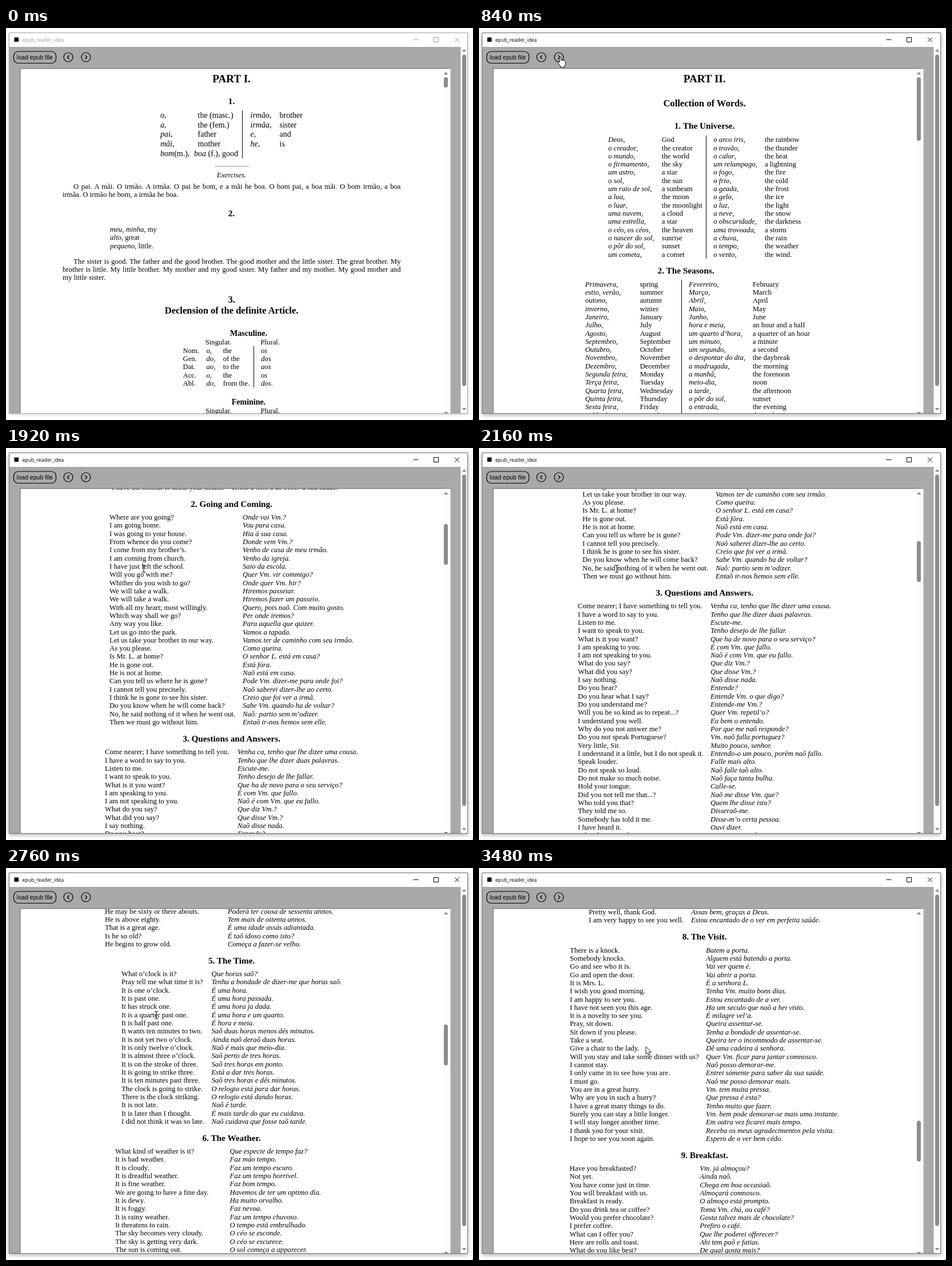
An HTML page for the animation above (3600 ms loop, 817 by 685 pixels).

```html
<!DOCTYPE html>
<html lang="en">
<head>
<meta charset="utf-8">
<title>epub_reader_idea</title>
<style>
html, body { margin: 0; width: 100%; height: 100%; overflow: hidden; background: #fff; }
#win { position: absolute; left: 5px; top: 8px; width: 801px; height: 664px; border: 1px solid #aaa; background: #a9a9a9; box-shadow: 0 1px 5px rgba(0,0,0,.22); }
#win.on { border-color: #777; box-shadow: 0 2px 7px rgba(0,0,0,.35); }
#stage { position: absolute; left: 0; top: 0; width: 817px; height: 685px; display: block; }
.page text, .page div { font: 12.73px "Liberation Serif", "Times New Roman", serif; fill: #000; color: #000; }
.page .i { font-style: italic; }
.page .m { text-anchor: middle; }
.page .h2 { font-size: 19.09px; font-weight: bold; }
.page .h3 { font-size: 16.55px; font-weight: bold; }
.page .h4 { font-size: 15.27px; font-weight: bold; }
.page .h5 { font-size: 14px; font-weight: bold; }
.page .big { font-size: 14px; }
.page div { line-height: 14.32px; text-align: justify; text-indent: 19.1px; }
.rule { stroke: #000; }
.line { fill: none; stroke: #000; stroke-width: 1.2; }
#title { font: 8.7px "Open Sans", "Noto Sans", sans-serif; }
#load { font: 10.61px "Liberation Sans", Arial, sans-serif; }
</style>
</head>
<body>
<div id="win"></div>
<svg id="stage" viewBox="0 0 817 685">
  <rect x="6" y="9" width="801" height="24" fill="#fff"/>
  <rect x="14.5" y="16.5" width="7.5" height="7.5"/>
  <g id="bar">
    <text id="title" x="28.5" y="23.5" fill="currentColor">epub_reader_idea</text>
    <path d="M712.5 20.5h9M748.5 16.5h8v8h-8zM785 16.5l8 8M793 16.5l-8 8" fill="none" stroke="currentColor"/>
  </g>
  <rect class="line" x="13.5" y="41" width="74" height="20.5" rx="8"/>
  <text id="load" x="18.8" y="55">load epub file</text>
  <g class="line">
    <circle cx="109" cy="51" r="8"/><path d="M110.8 47.8L107.2 51l3.6 3.2"/>
    <circle cx="139.8" cy="51" r="8"/><path d="M138.2 47.8l3.6 3.2-3.6 3.2"/>
  </g>
  <rect x="795.5" y="33" width="11.5" height="640" fill="#fcfcfc"/>
  <rect x="798" y="46.5" width="7" height="579" rx="3.5" fill="#8b8b8b"/>
  <path d="M797.8 41.5h7.4l-3.7-4.5zM797.8 664h7.4l-3.7 4.5z" fill="#8b8b8b"/>
  <rect x="24" y="70" width="753.5" height="603" fill="#808080"/>
  <rect x="776" y="71" width="2" height="602" fill="#d8d8d8"/>
  <svg x="25.5" y="71.5" width="751" height="601.5" viewBox="25.5 71.5 751 601.5">
    <rect x="25" y="71" width="752" height="603" fill="#fff"/>
    <g class="page"></g>
    <g class="page"></g>
    <g class="page"></g>
    <rect x="764" y="71" width="13" height="603" fill="#fcfcfc"/>
    <path d="M766 81.2h7.4l-3.7-4.5zM766 671h7.4l-3.7 4.5z" fill="#8b8b8b"/>
    <rect id="thumb" x="766" width="7" rx="3.5" fill="#8b8b8b"/>
  </svg>
  <rect x="816" y="683.5" width="1" height="1" fill="#444"/>
  <g id="cursor" stroke-linejoin="round">
    <path data-kind="arrow" d="M0 0V13.5L3 10.7 5 15.3 7.2 14.4 5.2 9.8H9.4Z" fill="#fff" stroke="#000" stroke-width=".9"/>
    <path data-kind="beam" d="M-3-6.2h2q1 0 1 1q0-1 1-1h2M0-5.2V5.2M-3 6.2h2q1 0 1-1q0 1 1 1h2" fill="none" stroke="#000"/>
    <path data-kind="hand" d="M-2 9V1.2Q-2-.4-.6-.4.8-.4.8 1.2V5.5Q.9 4.6 2.2 4.8 3.2 5 3.3 6 3.6 5.2 4.8 5.4 5.8 5.6 5.9 6.6 6.2 6 7.2 6.2 8.3 6.5 8.3 7.8V11.5L7 15V17.5H-.5V15.5L-4.5 10.3Q-5.2 9-4.2 8.3-3.2 7.8-2 9Z" fill="#fff" stroke="#000" stroke-width=".9"/>
  </g>
</svg>
<script>
const ROW = 14.32, MID = 394.6;
const pages = [...document.querySelectorAll('.page')];

const ital = s => s.replace(/_(.+?)_/g, '<tspan class="i">$1</tspan>');
const text = (x, y, s, cls = '') => `<text x="${x}" y="${y}" class="${cls}">${ital(s)}</text>`;
// y is the middle of the line
const row = (x, y, s, cls) => text(x, y + 4, s, cls);
const head = (y, s, cls = 'h4', x = MID) => text(x, y + 5, s, 'm ' + cls);
const rule = (x, y1, y2) => `<path class="rule" d="M${x} ${y1}V${y2}"/>`;
const para = (y, s) => `<foreignObject x="99" y="${y}" width="591.5" height="60"><div>${s}</div></foreignObject>`;
const lines = s => s.trim().split('\n').map(l => l.split('|'));
const word = s => s.replace(/[^,]+/g, '_$&_') + ',';

function partOne() {
  let out = head(89.5, 'PART I.', 'h2') + head(128, '1.');
  lines(`
_o_,|the (masc.)|_irmão_,|brother
_a_,|the (fem.)|_irmãa_,|sister
_pai_,|father|_e_,|and
_mãi_,|mother|_he_,|is`).forEach((cells, i) => cells.forEach((c, k) => {
    out += row([270, 335.5, 427.5, 478.5][k], 153 + i * 16.65, c, 'big');
  }));
  out += row(270, 219.6, '_bom_(m.),', 'big') + row(329, 219.6, '_boa_ (f.), good', 'big');
  out += rule(413.5, 144, 227.5) + '<path d="M365 241.5h60" stroke="#999"/>';
  out += row(MID, 256.5, '_Exercises._', 'm');
  out += para(269.8, 'O pai. A mãi. O irmão. A irmãa. O pai he bom, e a mãi he boa. O bom pai, a boa mãi. O bom irmão, a boa irmãa. O irmão he bom, a irmãa he boa.');
  out += head(323.5, '2.');
  ['_meu_, _minha_, my', '_alto_, great', '_pequeno_, little.'].forEach((s, i) => out += row(182, 352 + i * ROW, s));
  out += para(400.8, 'The sister is good. The father and the good brother. The good mother and the little sister. The great brother. My brother is little. My little brother. My mother and my good sister. My father and my mother. My good mother and my little sister.');
  out += head(475, '3.', 'h3') + head(493.5, 'Declension of the definite Article.', 'h3');
  out += head(533, 'Masculine.', 'h5', 424.5) + head(652.5, 'Feminine.', 'h5', 424.5);
  for (const y of [549, 668.5]) out += row(348.7, y, 'Singular.') + row(445.5, y, 'Plural.');
  lines(`
Nom.|_o_,|the|_os_
Gen.|_do_,|of the|_dos_
Dat.|_ao_,|to the|_aos_
Acc.|_o_,|the|_os_
Abl.|_do_,|from the.|_dos_.`).forEach((cells, i) => cells.forEach((c, k) => {
    out += row([309.5, 350.5, 379.7, 446][k], 563.6 + i * ROW, c);
  }));
  return out + rule(433.5, 556, 628);
}

function vocab(y, xs, list) {
  return lines(list).map((cells, i) => cells.map((c, k) => row(xs[k], y + i * ROW, k % 2 ? c : word(c))).join('')).join('');
}

function partTwo() {
  return head(89.5, 'PART II.', 'h2') + head(131.5, 'Collection of Words.', 'h3') + head(171, '1. The Universe.') +
  vocab(195.2, [226, 319.7, 410.3, 500], `
Deos|God|o arco iris|the rainbow
o creador|the creator|o trovão|the thunder
o mundo|the world|o calor|the heat
o firmamento|the sky|um relampago|a lightning
um astro|a star|o fogo|the fire
o sol|the sun|o frio|the cold
um raio de sol|a sunbeam|a geada|the frost
a lua|the moon|o gelo|the ice
o luar|the moonlight|a luz|the light
uma nuvem|a cloud|a neve|the snow
uma estrella|a star|o obscuridade|the darkness
o céo, os céos|the heaven|uma trovoada|a storm
o nascer do sol|sunrise|a chuva|the rain
o pôr do sol|sunset|o tempo|the weather
um cometa|a comet|o vento|the wind.`) + rule(397.5, 188, 403) +
  head(424, '2. The Seasons.', 'h4', 362) +
  vocab(447.6, [185.7, 281.4, 367, 478.7], `
Primavera|spring|Fevereiro|February
estio, verão|summer|Março|March
outono|autumn|Abril|April
inverno|winter|Maio|May
Janeiro|January|Junho|June
Julho|July|hora e meia|an hour and a half
Agosto|August|um quarto d’hora|a quarter of an hour
Septembro|September|um minuto|a minute
Outubro|October|um segundo|a second
Novembro|November|o despontar do dia|the daybreak
Dezembro|December|a madrugada|the morning
Segunda feira|Monday|a manhã|the forenoon
Terça feira|Tuesday|meio-dia|noon
Quarta feira|Wednesday|a tarde|the afternoon
Quinta feira|Thursday|o pôr do sol|sunset
Sexta feira|Friday|a entrada|the evening
Sabbado|Saturday|a noite|the night`) + rule(354.5, 440, 680);
}

const talks = `
#1. Eating and Drinking.|185|394
Are you hungry?|Vm. tem fome?
I have a good appetite.|Tenho boa vontade de comer.
I am very hungry.|Tenho bastante fome.
Eat something.|Coma alguma cousa.
What will you eat?|Que ha de Vm. comer?
What do you wish to eat?|Que é o que tem vontade de comer?
You do not eat.|O senhor naõ come.
I beg your pardon, I eat very heartily.|Com perdaõ de Vm., eu como muito bem.
I have eaten very heartily.|Tenho comido bastante.
I have dined with a good appetite.|Jantei de boa vontade.
Eat another piece.|Coma ainda mais alguma cousa.
I can eat no more.|Naõ comerei mais nada.
Are you thirsty?|Tem Vm. sêde?
Are you not thirsty?|Naõ tem Vm. sêde?
I am very thirsty.|Tenho bastante sêde.
I am dying of thirst.|Estou morrendo de sêde.
Let us drink.|Toça a beber.
Give me something to drink.|De-me de beber.
Will you drink a glass of wine?|Quer Vm. beber um copo de vinho?
Drink a glass of beer.|Tome um copo de cerveja.
Drink another glass of wine.|Beba mais esse copo de vinho.
Sir, I drink to your health.|Bebo a sua saude.
I have the honour to drink your health.|Tenho a honra de beber á sua saúde.
#2. Going and Coming.|181|414
Where are you going?|Onde vai Vm.?
I am going home.|Vou para casa.
I was going to your house.|Hia á sua casa.
From whence do you come?|Donde vem Vm.?
I come from my brother’s.|Venho de casa de meu irmão.
I am coming from church.|Venho da igreja.
I have just left the school.|Saio da escola.
Will you go with me?|Quer Vm. vir commigo?
Whither do you wish to go?|Onde quer Vm. hir?
We will take a walk.|Hiremos passeiar.
We will take a walk.|Hiremos fazer um passeio.
With all my heart; most willingly.|Quero, pois naõ. Com muito gosto.
Which way shall we go?|Per onde iremos?
Any way you like.|Para aquella que quizer.
Let us go into the park.|Vamos a tapada.
Let us take your brother in our way.|Vamos ter de caminho com seu irmão.
As you please.|Como queira.
Is Mr. L. at home?|O senhor L. está em casa?
He is gone out.|Está fóra.
He is not at home.|Naõ está em casa.
Can you tell us where he is gone?|Pode Vm. dizer-me para onde foi?
I cannot tell you precisely.|Naõ saberei dizer-lhe ao certo.
I think he is gone to see his sister.|Creio que foi ver a irmã.
Do you know when he will come back?|Sabe Vm. quando ha de voltar?
No, he said nothing of it when he went out.|Naõ: partio sem m’odizer.
Then we must go without him.|Entaõ ir-nos hemos sem elle.
#3. Questions and Answers.|173|405
Come nearer; I have something to tell you.|Venha ca, tenho que lhe dizer uma cousa.
I have a word to say to you.|Tenho que lhe dizer duas palavras.
Listen to me.|Escute-me.
I want to speak to you.|Tenho desejo de lhe fallar.
What is it you want?|Que ha de novo para o seu serviço?
I am speaking to you.|É com Vm. que fallo.
I am not speaking to you.|Naõ é com Vm. que eu fallo.
What do you say?|Que diz Vm.?
What did you say?|Que disse Vm.?
I say nothing.|Naõ disse nada.
Do you hear?|Entende?
Do you hear what I say?|Entende Vm. o que digo?
Do you understand me?|Entende-me Vm.?
Will you be so kind as to repeat...?|Quer Vm. repetil’o?
I understand you well.|Eu bem o entendo.
Why do you not answer me?|Por que me naõ responde?
Do you not speak Portuguese?|Vm. naõ falla portuguez?
Very little, Sir.|Muito pouco, senhor.
I understand it a little, but I do not speak it.|Entendo-o um pouco, porèm naõ fallo.
Speak louder.|Falle mais alto.
Do not speak so loud.|Naõ falle taõ alto.
Do not make so much noise.|Naõ faça tanta bulha.
Hold your tongue.|Calle-se.
Did you not tell me that...?|Naõ me disse Vm. que?
Who told you that?|Quem lhe disse isto?
They told me so.|Disseraõ-me.
Somebody has told it me.|Disse-m’o certa pessoa.
I have heard it.|Ouvi dizer.
What do you wish to say?|Que quer Vm. dizer?
What is that good for?|Para que é bom isto?
What do you call that?|Como chama Vm. a isto?
Do you know Mr. T.?|Conhece Vm. o senhor T.?
I know him by sight.|Conheço-o de vista.
I know him by name.|Conheço-o de nome.
#4. The Age.|173|387.7
How old are you?|Que idade tem Vm.?
How old is your brother?|Que idade tem o senhor seu irmão.
I am twelve years old.|Tenho doze annos.
I am ten years and six months old.|Tenho dés annos e meio.
Next month I shall be sixteen years old.|Hei de fazer desaseis annos no mez que vem.
I was thirteen years old last week.|Fiz treze annos a semana passada.
You do not look so old.|Vm. naõ me parecia ter tanta idade.
You look older.|Vm. parecia ter mais idade.
I thought you were older.|Cuidava que era mais velho.
I did not think you were so old.|Naõ cuidava que tivesse tanta idade.
How old is your uncle?|Que idade terá seu tio?
He is near sixty.|Tem perto de sessenta annos.
Is he so old?|Tem tanta idade?
He is more than fifty.|Tem mais de cincoenta annos.
He is a man of fifty.|É homem de cincoenta annos.
He may be sixty or there abouts.|Poderá ter cousa de sessenta annos.
He is above eighty.|Tem mais de oitenta annos.
That is a great age.|É uma idade assás adiantada.
Is he so old?|É taõ idoso como isto?
He begins to grow old.|Começa a fazer-se velho.
#5. The Time.|202|359.5
What o’clock is it?|Que horas saõ?
Pray tell me what time it is?|Tenha a bondade de dizer-me que horas saõ.
It is one o’clock.|É uma hora.
It is past one.|É uma hora passada.
It has struck one.|É uma hora ja dada.
It is a quarter past one.|É uma hora e um quarto.
It is half past one.|É hora e meia.
It wants ten minutes to two.|Saõ duas horas menos dés minutos.
It is not yet two o’clock.|Ainda naõ deraõ duas horas.
It is only twelve o’clock.|Naõ é mais que meio-dia.
It is almost three o’clock.|Saõ perto de tres horas.
It is on the stroke of three.|Saõ tres horas em ponto.
It is going to strike three.|Está a dar tres horas.
It is ten minutes past three.|Saõ tres horas e dés minutos.
The clock is going to strike.|O relogio está para dar horas.
There is the clock striking.|O relogio está dando horas.
It is not late.|Naõ é tarde.
It is later than I thought.|É mais tarde do que eu cuidava.
I did not think it was so late.|Naõ cuidava que fosse taõ tarde.
#6. The Weather.|191|391.5
What kind of weather is it?|Que especie de tempo faz?
It is bad weather.|Faz máo tempo.
It is cloudy.|Faz um tempo escuro.
It is dreadful weather.|Faz um tempo horrivel.
It is fine weather.|Faz bom tempo.
We are going to have a fine day.|Havemos de ter um optimo dia.
It is dewy.|Ha muito orvalho.
It is foggy.|Faz nevoa.
It is rainy weather.|Faz um tempo chuvoso.
It threatens to rain.|O tempo está embrulhado.
The sky becomes very cloudy.|O céo se esconde.
The sky is getting very dark.|O céo se escurece.
The sun is coming out.|O sol começa a apparecer.
The sun shines.|O sol brilha.
It is very hot.|Faz muito calor.
It is sultry.|Faz calma.
I am very warm.|Tenho muito calor.
It is cold.|Faz frio.
It is very cold.|Faz muito frio.
I am cold.|Tenho frio.
It freezes.|Gela.
It snows.|Neva.
It hails.|Cahe saraiva.
It thaws.|Desgela.
It rains.|Chove.
It pours.|Chove a cantaros.
Take your umbrella.|Leve o seu chapéo de chuva.
The wind blows.|Faz vento.
The wind is high.|O vento é forte.
The wind has changed.|O vento mudou.
It thunders.|Troveja.
It lightens.|Relampeja.
The storm is over.|Passou a trovoada.
I see a rainbow.|Vejo o arco iris.
The sky clears up.|O céo está aclarando.
It is a fine night.|Faz uma bella noite.
#7. The Health.|192|371
Good morning, Sir.|Bons dias, senhor.
Good evening, Madam.|Boas tardes, senhora.
Good night.|Boas noites.
How do you do?|Como está Vm.?
Very well, I thank you.|Muito bem, obrigado.
And how are you?|E Vm. como passa?
So so.|Assim, assim.
Not very well.|Naõ muito bem.
I am not well.|Naõ estou bom.
I am ill.|Estou doente.
What ails you?|Que tem Vm.?
I have a cold.|Estou constipado.
I have a headache.|Dóe-me a cabeça.
I have a toothache.|Doem-me os dentes.
Have you a fever?|Tem Vm. febre?
I have a cough.|Tenho tosse.
Did you sleep well?|Dormio Vm. bem?
I did not sleep.|Naõ dormi.
I am sorry for it.|Sinto muito.
You look pale.|Vm. está pallido.
You look very well.|Vm. tem boa cara.
Send for the doctor.|Mande chamar o medico.
Take some rest.|Descance um pouco.
I feel better.|Sinto-me melhor.
I am glad of it.|Estimo muito.
How is your father?|Como está seu pai?
He is quite well.|Está muito bom.
And your mother?|E a senhora sua mãi?
She is a little better.|Está um pouco melhor.
Is your sister well?|Sua irmã está boa?
Are they all well at home?|Estaõ todos bons em casa?
How are your children?|Como estaõ seus filhos?
Pretty well, thank God.|Assas bem, graças a Deus.
I am very happy to see you well.|Estou encantado de o ver em perfeita saúde.
#8. The Visit.|159|397
There is a knock.|Batem a porta.
Somebody knocks.|Alguem está batendo a porta.
Go and see who it is.|Vai ver quem é.
Go and open the door.|Vai abrir a porta.
It is Mrs. L.|É a senhora L.
I wish you good morning.|Tenha Vm. muito bons dias.
I am happy to see you.|Estou encantado de a ver.
I have not seen you this age.|Ha um seculo que naõ a hei visto.
It is a novelty to see you.|É milagre vel’a.
Pray, sit down.|Queira assentar-se.
Sit down if you please.|Tenha a bondade de assentar-se.
Take a seat.|Queira ter o incommodo de assentar-se.
Give a chair to the lady.|Dê uma cadeira á senhora.
Will you stay and take some dinner with us?|Quer Vm. ficar para jantar comnosco.
I cannot stay.|Naõ posso demorar-me.
I only came in to see how you are.|Entrei sómente para saber da sua saúde.
I must go.|Naõ me posso demorar mais.
You are in a great hurry.|Vm. tem muita pressa.
Why are you in such a hurry?|Que pressa é esta?
I have a great many things to do.|Tenho muito que fazer.
Surely you can stay a little longer.|Vm. bem pode demorar-se mais uma instante.
I will stay longer another time.|Em outra vez ficarei mais tempo.
I thank you for your visit.|Receba os meus agradecimentos pela visita.
I hope to see you soon again.|Espero de o ver bem cédo.
#9. Breakfast.|158.5|386.3
Have you breakfasted?|Vm. já almoçou?
Not yet.|Ainda naõ.
You have come just in time.|Chega em boa occasiaõ.
You will breakfast with us.|Almoçará comnosco.
Breakfast is ready.|O almoço está prompto.
Do you drink tea or coffee?|Toma Vm. chá, ou café?
Would you prefer chocolate?|Gosta talvez mais de chocolate?
I prefer coffee.|Prefiro o café.
What can I offer you?|Que lhe poderei offerecer?
Here are rolls and toast.|Ahi tem paõ e fatias.
What do you like best?|De qual gosta mais?`;

function dialogues() {
  let out = head(88, 'Easy Dialogues.', 'h3'), y = 99.2 + ROW, xa, xb;
  for (const [a, b, c] of lines(talks)) {
    if (a[0] === '#') {
      y += 52.2 - ROW;
      [xa, xb] = [b, c];
      out += head(y - 23.5, a.slice(1));
    } else {
      out += row(xa, y, a) + row(xb, y, b, 'i');
    }
    if (a[0] !== '#') y += ROW;
  }
  return out;
}

[partOne, partTwo, dialogues].forEach((make, i) => pages[i].innerHTML = make());

const LOOP = 3600, STEP = 120;
const thumbSize = [18, 111, 71.5];
const scrollKeys = [[1560, 0], [1920, 397.6], [2400, 907.6], [2760, 1592.7], [3480, 3022.4]];
const moveKeys = [[120, 300, 330], [240, 143, 51], [360, 143, 51], [480, 330, 360], [600, 510, 650], [720, 45, 32],
  [840, 143, 51], [1200, 143, 51], [1320, 178, 105], [1440, 226, 188], [1560, 241, 211],
  [2520, 241, 211], [2760, 263, 257], [3480, 292, 312]];
const kindKeys = [[0, ''], [120, 'arrow'], [240, 'hand'], [480, 'arrow'], [840, 'hand'], [1320, 'arrow'], [1440, 'beam'], [3480, 'arrow']];

function at(keys, t, k = 1) {
  const j = keys.findIndex(key => key[0] > t);
  if (j < 0) return keys[keys.length - 1][k];
  if (j === 0) return keys[0][k];
  const a = keys[j - 1], b = keys[j];
  return a[k] + (b[k] - a[k]) * (t - a[0]) / (b[0] - a[0]);
}

const el = id => document.getElementById(id);
const shapes = [...el('cursor').children];
let last = -1;

function draw(t) {
  const page = t < 360 ? 0 : t < 1200 ? 1 : 2;
  const active = t >= 240, scroll = at(scrollKeys, t);
  el('win').className = active ? 'on' : '';
  el('bar').style.color = active ? '#000' : '#999';
  pages.forEach((p, i) => p.style.display = i === page ? '' : 'none');
  pages[2].setAttribute('transform', `translate(0 ${-scroll})`);
  el('thumb').setAttribute('y', 86 + scroll / 8.5);
  el('thumb').setAttribute('height', thumbSize[page]);
  const kind = kindKeys.filter(k => k[0] <= t).pop()[1];
  shapes.forEach(s => s.style.display = s.dataset.kind === kind ? '' : 'none');
  el('cursor').setAttribute('transform', `translate(${at(moveKeys, t)} ${at(moveKeys, t, 2)})`);
}

function tick() {
  const t = Math.floor(performance.now() % LOOP / STEP) * STEP;
  if (t !== last) draw(last = t);
  requestAnimationFrame(tick);
}
tick();
</script>
</body>
</html>
```
